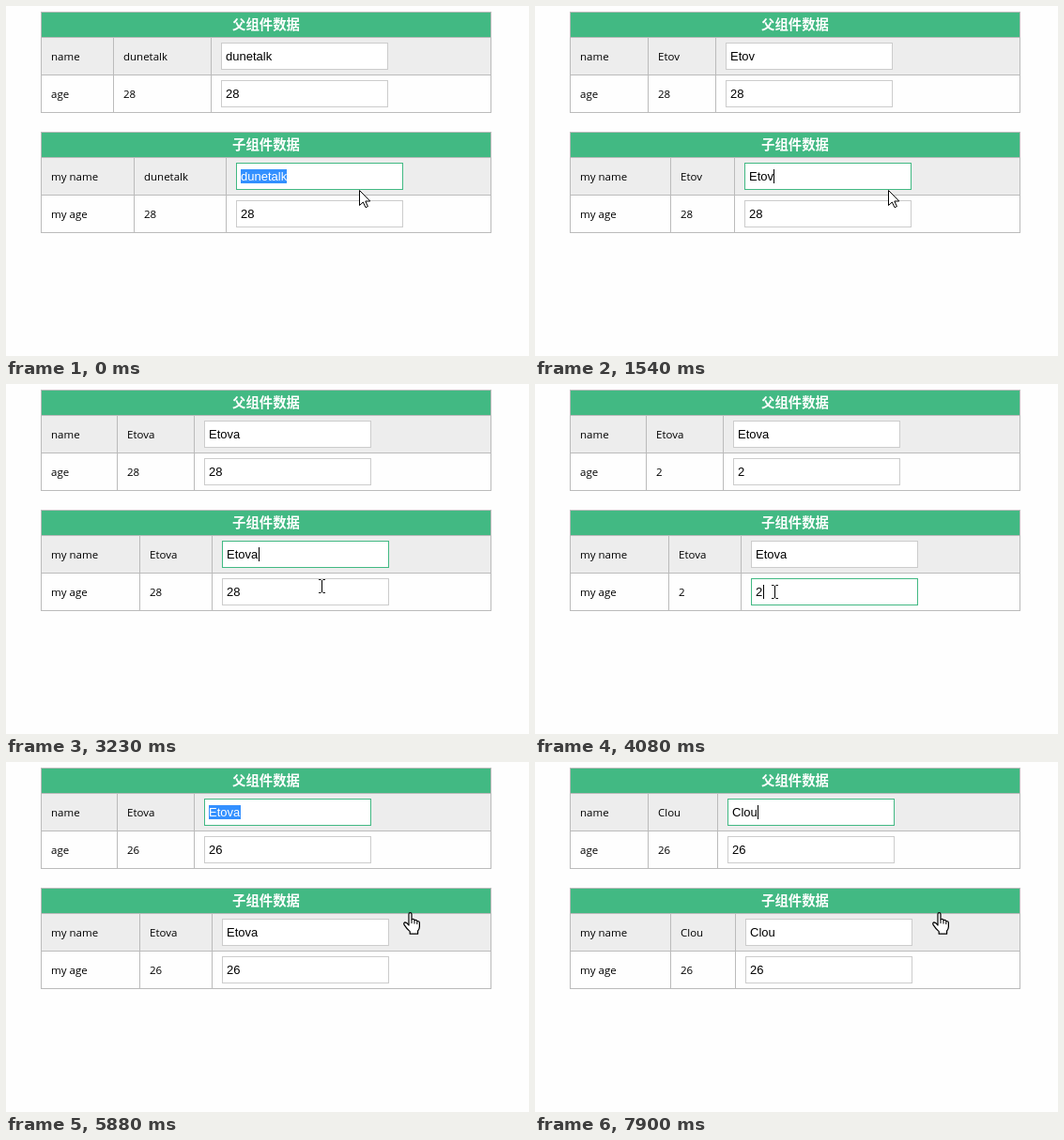
An HTML page for the animation above (8000 ms loop, 557x373 px).

```html
<!DOCTYPE html>
<html lang="zh">
<head>
<meta charset="utf-8">
<title>Two-way binding</title>
<style>
html, body { margin: 0; width: 100%; height: 100%; overflow: hidden; background: #fefefe; }
svg { display: block; width: 557px; height: 373px; }
text { white-space: pre; }
rect { shape-rendering: crispEdges; }
.head { font: bold 14.4px "Noto Sans CJK SC", "Noto Sans CJK", sans-serif; fill: #fff; text-anchor: middle; }
.label { font: 11.5px "Open Sans", "Noto Sans", sans-serif; fill: #000; }
.value { font: 13px "Liberation Sans", Arial, sans-serif; fill: #000; }
</style>
</head>
<body>
<svg id="stage" viewBox="0 0 557 373"></svg>
<script>
const LOOP = 8000, GREEN = '#42b983', LINE = '#bbb';
const stage = document.getElementById('stage');

// Column dividers: parent first, parent second, child first, child second
const short = [123, 181, 148, 202], medium = [122, 185, 146, 206];
const columns = {
  dunetalk: [114, 218, 136, 234],
  E: short, Et: short, Eto: medium, Etov: [120, 192, 144, 212], Etova: [118, 200, 142, 219],
  C: short, Cl: short, Clo: medium, Clou: [120, 194, 144, 213]
};

const names = [[0, 'dunetalk'], [720, 'E'], [990, 'Et'], [1140, 'Eto'], [1540, 'Etov'],
  [2100, 'Etova'], [7220, 'C'], [7340, 'Cl'], [7620, 'Clo'], [7900, 'Clou']];
const ages = [[0, '28'], [3960, '2'], [4470, '26']];

// Focused field: table and row
const focus = [[0, '10'], [3380, '11'], [5280, '00']];
const marks = [[0, 'select'], [720, 'caret'], [2690, ''], [3230, 'caret'], [3530, 'select'],
  [3960, 'caret'], [5010, ''], [5280, 'caret'], [5430, 'select'], [7220, 'caret']];

const pointer = [
  [0, 'arrow', 376, 196], [2960, 'arrow', 360, 199], [3080, 'beam', 341, 212],
  [3230, 'beam', 336, 215], [3380, 'beam', 318, 220], [3530, 'beam', 191, 205],
  [3680, 'beam', 204, 215], [3960, 'beam', 230, 219], [4080, 'beam', 255, 221],
  [4230, 'beam', 286, 228], [4350, 'beam', 308, 234], [4470, 'beam', 317, 236],
  [4620, 'arrow', 306, 165], [4740, 'beam', 287, 94], [4890, 'beam', 275, 63],
  [5010, 'beam', 274, 58], [5130, 'beam', 278, 55], [5430, 'beam', 170, 40],
  [5580, 'beam', 261, 66], [5730, 'hand', 427, 158], [5880, 'hand', 423, 160]
];

function make(tag, attrs, parent = stage) {
  const el = document.createElementNS('http://www.w3.org/2000/svg', tag);
  set(el, attrs);
  parent.append(el);
  return el;
}
function set(el, attrs) {
  for (const key in attrs) el.setAttribute(key, attrs[key]);
}
const box = (x, y, width, height, fill) => make('rect', { x, y, width, height, fill });
function write(cls, x, y, content) {
  const el = make('text', { class: cls, x, y });
  el.textContent = content;
  return el;
}

function makeField(y) {
  return {
    y,
    frame: make('rect', { y: y + .5, width: 177, height: 28, fill: '#fff' }),
    selection: box(0, y + 7, 0, 15, '#3390ff'),
    value: write('value', 0, y + 19, ''),
    caret: box(0, y + 7, 1, 15, '#000')
  };
}

function makeTable(top, title, labels) {
  box(37, top, 480, 108, LINE);
  box(38, top + 1, 478, 26, GREEN);
  box(38, top + 28, 478, 39, '#ededed');
  box(38, top + 68, 478, 39, '#fefefe');
  write('head', 277, top + 19, title);
  const dividers = [0, 1].map(() => box(0, top + 28, 1, 79, LINE));
  const rows = labels.map((label, i) => {
    const y = top + 33 + i * 40;
    write('label', 48, y + 19, label);
    return { cell: write('label', 0, y + 19, ''), field: makeField(y) };
  });
  return { dividers, rows };
}

const tables = [
  makeTable(6, '父组件数据', ['name', 'age']),
  makeTable(134, '子组件数据', ['my name', 'my age'])
];

const cursors = {};
function makeCursor(name, ...paths) {
  const group = cursors[name] = make('g', { 'stroke-linejoin': 'round' });
  for (const [d, fill, width] of paths)
    make('path', { d, fill, stroke: '#000', 'stroke-width': width }, group);
}
makeCursor('arrow', ['M.5.5V16.5L4.3 13L7 18.7L9.4 17.6L6.8 12H11.8Z', '#fff', 1]);
makeCursor('beam', ['M-3 -6.5H-.5M1.5 -6.5H4M.5 -6V7M-3 7.5H-.5M1.5 7.5H4', 'none', 1]);
makeCursor('hand',
  ['M6 14V2.3Q6 .6 7.5 .6Q9 .6 9 2.3V7.8Q11.8 6.8 12 8.6Q14.4 7.8 14.8 9.6Q17.3 9.2 17.4 11.5V15.5' +
   'Q17.4 18 15.6 20V23.2H7.2V20.6Q4 18 1 13.4Q.2 11.4 2 10.9Q3.6 10.8 6 14Z', '#fff', 1.2],
  ['M9 8V12M12 9V12.5M14.8 10V13', 'none', 1]);

const at = (steps, t) => steps.findLast(step => step[0] <= t);

function drawField(field, x, content, mark, active) {
  const { frame, selection, value, caret } = field;
  set(frame, { x: x + .5, stroke: active ? GREEN : '#ccc' });
  set(value, { x: x + 5 });
  value.textContent = content;
  const width = Math.ceil(value.getComputedTextLength() - .2);
  const selected = active && mark === 'select';
  value.style.fill = selected ? '#fff' : '#000';
  set(selection, { x: x + 5, width: selected ? width : 0 });
  set(caret, { x: x + 5 + width, width: active && mark === 'caret' ? 1 : 0 });
}

function draw(t) {
  const name = at(names, t)[1], values = [name, at(ages, t)[1]];
  const target = at(focus, t)[1], mark = at(marks, t)[1];
  tables.forEach(({ dividers, rows }, i) => {
    const [first, second] = columns[name].slice(i * 2);
    set(dividers[0], { x: first });
    set(dividers[1], { x: second });
    rows.forEach(({ cell, field }, j) => {
      set(cell, { x: first + 11 });
      cell.textContent = values[j];
      drawField(field, second + 11, values[j], mark, target === `${i}${j}`);
    });
  });
  const [, kind, x, y] = at(pointer, t);
  for (const key in cursors) cursors[key].style.display = key === kind ? '' : 'none';
  set(cursors[kind], { transform: `translate(${x} ${y})` });
}

const start = performance.now();
function tick() {
  draw((performance.now() - start) % LOOP);
  requestAnimationFrame(tick);
}
tick();
</script>
</body>
</html>
```
